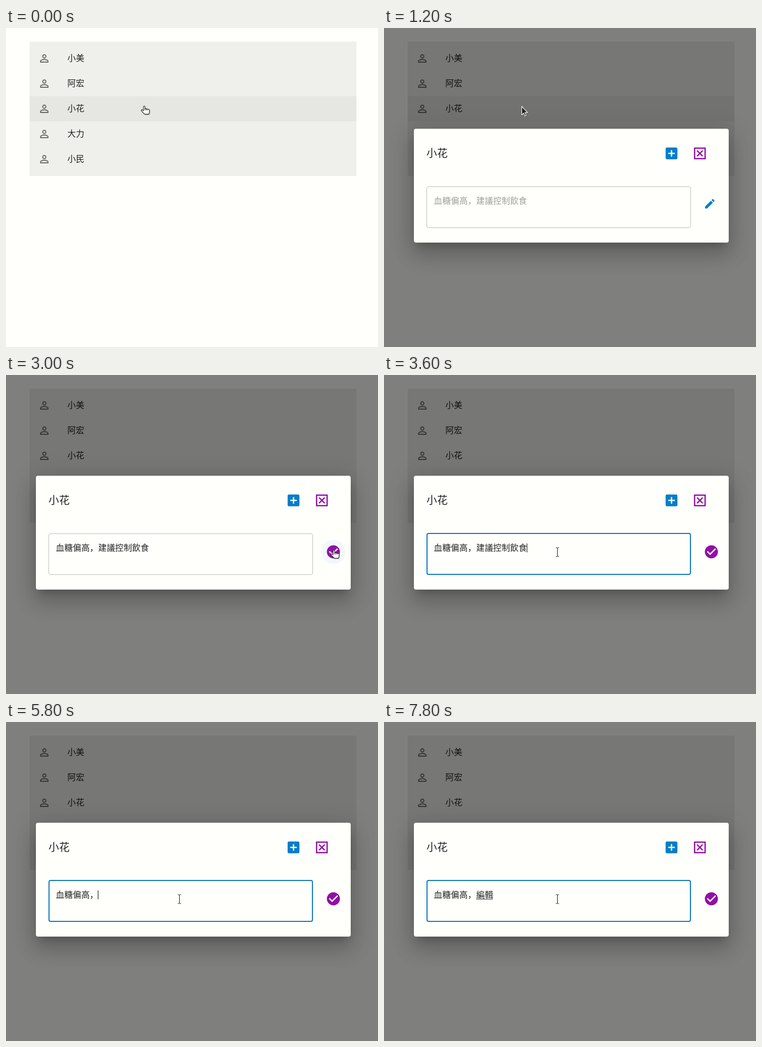
Animation of 709x608 px, one loop 8000 ms. Source, as an HTML page with a canvas:

```html
<!DOCTYPE html>
<html lang="zh-Hans">
<head>
<meta charset="utf-8">
<title>Edit dialog</title>
<style>
html, body { margin: 0; width: 100%; height: 100%; overflow: hidden; background: #fffffb; }
canvas { display: block; }
</style>
</head>
<body>
<canvas id="stage" width="709" height="608"></canvas>
<script>
const ctx = document.getElementById('stage').getContext('2d');
const LOOP = 8000, STEP = 200;
const PAPER = '#fffffb', BLUE = '#047dca', PURPLE = '#920fa5';
const INK = 'rgba(0,0,0,.87)', GREY = 'rgba(0,0,0,.54)', FAINT = 'rgba(0,0,0,.38)';
const FONT = "Roboto, 'Noto Sans CJK SC', 'Noto Sans CJK', sans-serif";
const PEOPLE = ['小美', '阿宏', '小花', '大力', '小民'];
const NOTE = '血糖偏高，建議控制飲食', KEPT = 5;
const COMPOSED = ['ㄅ', 'ㄅㄧ', '編', '編ㄐ', '編輯'];

const ICON = {
  person: new Path2D('M12 5.9c1.16 0 2.1.94 2.1 2.1s-.94 2.1-2.1 2.1S9.9 9.16 9.9 8s.94-2.1 2.1-2.1m0 9c2.97 0 6.1 1.46 6.1 2.1v1.1H5.9V17c0-.64 3.13-2.1 6.1-2.1M12 4C9.79 4 8 5.79 8 8s1.79 4 4 4 4-1.79 4-4-1.79-4-4-4zm0 9c-2.67 0-8 1.34-8 4v3h16v-3c0-2.66-5.33-4-8-4z'),
  add: new Path2D('M19 3H5c-1.1 0-2 .9-2 2v14c0 1.1.9 2 2 2h14c1.1 0 2-.9 2-2V5c0-1.1-.9-2-2-2zm-2 10h-4v4h-2v-4H7v-2h4V7h2v4h4z'),
  close: new Path2D('M3 3v18h18V3zM19 19H5V5h14zM17 8.4 13.4 12 17 15.6 15.6 17 12 13.4 8.4 17 7 15.6 10.6 12 7 8.4 8.4 7 12 10.6 15.6 7z'),
  edit: new Path2D('M3 17.25V21h3.75L17.81 9.94l-3.75-3.75zM20.71 7.04c.39-.39.39-1.02 0-1.41l-2.34-2.34c-.39-.39-1.02-.39-1.41 0l-1.83 1.83 3.75 3.75z'),
  check: new Path2D('M12 2C6.48 2 2 6.48 2 12s4.48 10 10 10 10-4.48 10-10S17.52 2 12 2zm-2 15-5-5 1.41-1.41L10 14.17l7.59-7.59L19 8z')
};
const CURSOR = {
  arrow: new Path2D('M0 0V16L3.7 12.6 6.1 18.2 8.6 17.1 6.2 11.6H11.2Z'),
  hand: new Path2D('M5 10V2.2Q5 .7 6.4 .7T7.9 2.2V6.2Q9.3 5 10.6 6.4 12 5.5 13.2 7 15.4 6.2 16.4 8.2V12Q16.2 14.2 14.8 16.4H7.4Q4.6 13.4 1 9.8 .2 8 2 7.9 3.6 8.2 5 10Z'),
  lines: new Path2D('M7.9 6V9M10.6 6.4V9M13.2 7V9.2'),
  beam: new Path2D('M-3 -8H-1L0 -7 1 -8H3M0 -7V8M-3 9H-1L0 8 1 9H3')
};

// [start time, shape, x, y]
const MOVES = [
  [0, 'hand', 257, 148],
  [1000, 'arrow', 262.5, 149.5],
  [1600, 'arrow', 262.5, 215.5],
  [1800, 'arrow', 261.5, 298.5],
  [2000, 'arrow', 450.5, 324.5],
  [2200, 'arrow', 664.5, 357.5],
  [2400, 'hand', 618.5, 333],
  [3200, 'beam', 450.5, 337],
  [3400, 'beam', 330.5, 337]
];

function text(str, x, y, size, color) {
  ctx.font = `${size}px ${FONT}`;
  ctx.letterSpacing = '0.15px';
  ctx.fillStyle = color;
  ctx.fillText(str, x, y);
  return ctx.measureText(str).width;
}

function icon(path, cx, cy, size, color) {
  ctx.save();
  ctx.translate(cx - size / 2, cy - size / 2);
  ctx.scale(size / 24, size / 24);
  ctx.fillStyle = color;
  ctx.fill(path, 'evenodd');
  ctx.restore();
}

function disc(x, y, r, color) {
  ctx.fillStyle = color;
  ctx.beginPath();
  ctx.arc(x, y, r, 0, 7);
  ctx.fill();
}

function box(x, y, w, h, r) {
  ctx.beginPath();
  ctx.roundRect(x, y, w, h, r);
}

function shadow(x, y, w, h, dy, blur, spread, alpha) {
  const far = 2000;
  ctx.save();
  ctx.shadowColor = `rgba(0,0,0,${alpha})`;
  ctx.shadowBlur = blur;
  ctx.shadowOffsetX = far;
  ctx.shadowOffsetY = dy;
  ctx.fillStyle = '#000';
  box(x - spread - far, y - spread, w + 2 * spread, h + 2 * spread, 4 + Math.max(spread, -4));
  ctx.fill();
  ctx.restore();
}

function drawList(t) {
  ctx.fillStyle = '#efefec';
  ctx.fillRect(45, 26, 623, 256);
  if (t < 1400) {
    ctx.fillStyle = '#e6e6e3';
    ctx.fillRect(45, 130, 623, 48);
  }
  if (t >= 800 && t < 1200) {
    ctx.save();
    ctx.beginPath();
    ctx.rect(45, 130, 623, 48);
    ctx.clip();
    disc(262, 154, t < 1000 ? 55 : 153, 'rgba(0,0,0,.14)');
    ctx.restore();
  }
  PEOPLE.forEach((name, i) => {
    icon(ICON.person, 73, 58 + 48 * i, 24, GREY);
    text(name, 117, 63 + 48 * i, 16, INK);
  });
}

function drawField(t) {
  const focus = t >= 3600, hover = t >= 3200 && !focus;
  ctx.lineWidth = focus ? 2 : 1;
  ctx.strokeStyle = focus ? '#0c7abb' : hover ? INK : 'rgba(0,0,0,.26)';
  if (focus) box(82, 302, 502, 78, 3);
  else box(81.5, 302.5, 503, 78, 3.5);
  ctx.stroke();

  const cut = t < 4400 ? 0 : Math.min(6, (t - 4400) / STEP + 1);
  const note = NOTE.slice(0, Math.max(KEPT, NOTE.length - cut));
  let end = 95 + text(note, 95, 335, 16, t < 3000 ? FAINT : INK);
  if (t >= 6400) {
    const word = COMPOSED[Math.min(4, (t - 6400) / STEP)];
    const width = text(word, end, 335, 16, INK);
    ctx.fillRect(Math.round(end), 337, Math.round(width) - 1, 1);
    end += width;
  }
  const blinkOff = (t >= 5400 && t < 5800) || t >= 7800;
  if (focus && !blinkOff) {
    ctx.fillStyle = '#000';
    ctx.fillRect(Math.floor(end), 321, 1, 17);
  }
}

function drawAction(t) {
  if (t < 3000) {
    if (t >= 2400) disc(621, 335, 20, 'rgba(4,125,202,.05)');
    if (t >= 2600) disc(621, 335, 20, 'rgba(4,125,202,.12)');
    icon(ICON.edit, 621, 335, 24, BLUE);
  } else {
    if (t < 3200) disc(624, 337, 23, 'rgba(4,125,202,.05)');
    icon(ICON.check, 624, 337, 30, PURPLE);
  }
}

function drawDialog(t) {
  const loaded = t >= 1200;
  const top = loaded ? 192 : 244, height = loaded ? 217 : 113;
  ctx.save();
  ctx.globalAlpha = loaded ? 1 : 0.02;
  ctx.fillStyle = 'rgba(0,0,0,.5)';
  ctx.fillRect(0, 0, 709, 608);
  shadow(57, top, 600, height, 11, 15, -7, 0.2);
  shadow(57, top, 600, height, 24, 38, 3, 0.14);
  shadow(57, top, 600, height, 9, 46, 8, 0.12);
  ctx.fillStyle = PAPER;
  box(57, top, 600, height, 4);
  ctx.fill();
  text('小花', 81, top + 54, 20, INK);
  icon(ICON.add, 548, top + 47, 30, BLUE);
  icon(ICON.close, 602, top + 47, 30, PURPLE);
  if (loaded) {
    drawField(t);
    drawAction(t);
  }
  ctx.restore();
}

function drawCursor(t) {
  const [, kind, x, y] = MOVES.findLast(m => t >= m[0]);
  const stroke = (path, color, width) => {
    ctx.strokeStyle = color;
    ctx.lineWidth = width;
    ctx.stroke(path);
  };
  const path = CURSOR[kind];
  ctx.save();
  ctx.translate(x, y);
  ctx.lineJoin = 'round';
  if (kind === 'beam') {
    stroke(path, '#fff', 2.5);
    stroke(path, '#111', 1);
  } else {
    ctx.shadowColor = 'rgba(0,0,0,.35)';
    ctx.shadowBlur = 2;
    ctx.shadowOffsetX = ctx.shadowOffsetY = 1;
    ctx.fillStyle = kind === 'hand' ? '#fff' : '#222';
    ctx.fill(path);
    ctx.shadowColor = 'transparent';
    stroke(path, kind === 'hand' ? '#222' : '#fff', 1.1);
    if (kind === 'hand') stroke(CURSOR.lines, '#222', 1);
  }
  ctx.restore();
}

function frame(now) {
  const t = Math.floor(now % LOOP / STEP) * STEP;
  ctx.fillStyle = PAPER;
  ctx.fillRect(0, 0, 709, 608);
  drawList(t);
  if (t >= 1000) drawDialog(t);
  drawCursor(t);
  requestAnimationFrame(() => frame(performance.now() - start));
}

const start = performance.now();
frame(0);
</script>
</body>
</html>
```
